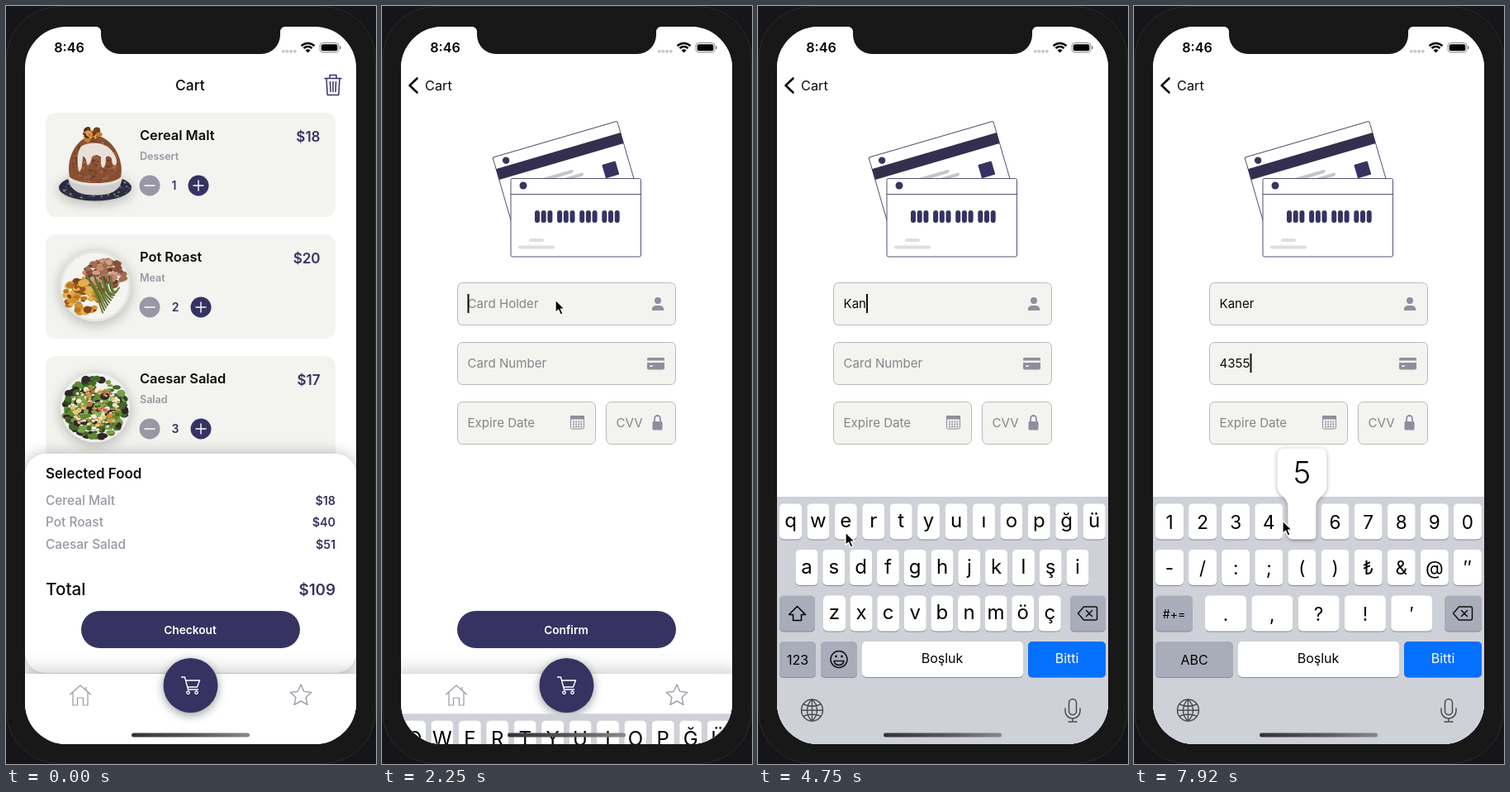
Write an HTML page with a canvas that moves like this. It is 448x916 px and loops after 8000 ms.

```html
<!DOCTYPE html>
<html lang="en">
<head>
<meta charset="utf-8">
<title>Cart checkout</title>
<style>
html, body { margin: 0; width: 100%; height: 100%; overflow: hidden; background: #15151a }
canvas { display: block; width: 448px; height: 916px }
</style>
</head>
<body>
<canvas id="stage"></canvas>
<script>
const LOOP = 8000, NAVY = '#363362', GRAY = '#9897a5', CREAM = '#f3f3ef', BODY = '#181818', INK = '#0c0c10';
const canvas = document.getElementById('stage'), c = canvas.getContext('2d');
const dpr = window.devicePixelRatio || 1;
canvas.width = 448 * dpr;
canvas.height = 916 * dpr;

const PUSH = 1271, KEYS_UP = 2218, NUMERIC = 5900;
const NAME = 'Kaner';
const presses = [[3350, 'K'], [3850, 'a'], [4300, 'n'], [4780, 'e'], [5230, 'r'],
  [6850, '4'], [7200, '3'], [7550, '5'], [7850, '5']];
const pointer = [[0, 452, 838], [90, 434, 828], [900, 282, 750], [1000, 269, 743], [1780, 269, 743],
  [2120, 210, 355], [2270, 210, 355], [2590, 176, 537], [3270, 288, 688], [3420, 288, 688],
  [3760, 60, 688], [3920, 60, 688], [4220, 256, 742], [4380, 256, 742], [4740, 106, 636],
  [4880, 106, 636], [5150, 139, 632], [5320, 139, 632], [5760, 200, 432], [5950, 200, 432],
  [6650, 161, 627], [6930, 161, 627], [7130, 122, 628], [7270, 122, 628], [7480, 203, 628],
  [7860, 203, 628], [7920, 180, 622], [8000, 172, 620]];

const lerp = (a, b, k) => a + (b - a) * k;
const clamp = v => Math.max(0, Math.min(1, v));
const spring = ms => { const u = Math.max(0, ms) * .01826; return 1 - (1 + u) * Math.exp(-u); };

function text(s, x, y, size, weight = 400, color = INK, align = 'left') {
  c.font = `${weight} ${size}px Inter, sans-serif`;
  c.textAlign = align;
  c.fillStyle = color;
  c.fillText(s, x, y);
}
function box(x, y, w, h, r, fill, line) {
  c.beginPath();
  c.roundRect(x, y, w, h, r);
  if (fill) { c.fillStyle = fill; c.fill(); }
  if (line) { c.strokeStyle = line; c.lineWidth = 1; c.stroke(); }
}
function oval(x, y, rx, ry, fill) {
  c.beginPath();
  c.ellipse(x, y, rx, ry, 0, 0, 7);
  c.fillStyle = fill;
  c.fill();
}
const disc = (x, y, r, fill) => oval(x, y, r, r, fill);
function shadow(color, blur, dy, draw) {
  c.save();
  c.shadowColor = color;
  c.shadowBlur = blur * dpr;
  c.shadowOffsetY = dy * dpr;
  draw();
  c.restore();
}
function at(x, y, draw, angle = 0) {
  c.save();
  c.translate(x, y);
  c.rotate(angle);
  draw();
  c.restore();
}
function icon(d, x, y, line, width = 1.5, fill) {
  at(x, y, () => {
    const p = new Path2D(d);
    c.lineJoin = c.lineCap = 'round';
    if (fill) { c.fillStyle = fill; c.fill(p); }
    if (line) { c.strokeStyle = line; c.lineWidth = width; c.stroke(p); }
  });
}
function scatter(seed, n, x, y, rx, ry, size, colors) {
  const rnd = () => (seed = seed * 16807 % 2147483647) / 2147483647;
  rnd();
  for (let i = 0; i < n; i++) {
    const a = rnd() * 6.283, r = Math.sqrt(rnd()), s = size * (.5 + rnd());
    oval(x + Math.cos(a) * r * rx, y + Math.sin(a) * r * ry, s, s * (.5 + rnd() * .5), colors[Math.floor(rnd() * colors.length)]);
  }
}

// Food, drawn around its centre
function dessert() {
  shadow('#0004', 16, 3, () => oval(0, 28, 44, 16, '#2b2c40'));
  scatter(9, 120, 0, 28, 42, 14, 1.4, ['#586184', '#20212f', '#6d7c6a', '#47406b']);
  icon('M-33 14C-32 32-19 37 0 37S32 32 33 14Z', 0, 0, 0, 0, '#cfccca');
  oval(0, 16, 33, 10, '#e6e2de');
  icon('M-31 15C-36-8-22-34-2-35S36-8 31 15C24 25-22 25-31 15Z', 0, 0, 0, 0, '#885033');
  scatter(4, 170, 0, -3, 28, 25, 1.7, ['#6d3d28', '#a3683f', '#7c472c', '#955a3c']);
  icon('M-17-22C-4-29 14-27 22-14Q28-5 25 1Q20 2 20-7Q17-12 13-9Q13 4 9 4Q6 1 7-9Q1-14-4-9Q-6 2-10 0Q-11-9-15-10Q-16 10-20 8Q-24-12-17-22Z', 0, 0, 0, 0, '#e9e1d9');
  scatter(7, 30, -5, -36, 10, 8, 3, ['#c27c2c', '#46271c', '#e2a04a', '#72421f']);
}
function plate() {
  shadow('#0004', 16, 3, () => disc(0, 0, 43, '#e6e6e2'));
  disc(0, 0, 40, '#f5f4f0');
  scatter(21, 110, -14, 11, 22, 22, 3.8, ['#d3922f', '#b87522', '#e4b04e', '#96571c', '#7c4518']);
  scatter(5, 110, 12, -15, 24, 17, 3.6, ['#a46b52', '#86503c', '#bf8a70', '#d2a184', '#6c3d2c']);
  for (let i = 0; i < 11; i++)
    icon(`M${-10 + i * 3} ${-12 + i % 3 * 4}Q${i * 2} ${5 + i} ${9 + i * 2} ${32 - i * 3}`, 0, 0, i % 2 ? '#4e6429' : '#6b7d3b', 2);
}
function salad() {
  shadow('#0004', 16, 3, () => disc(0, 0, 42, '#f1f1ee'));
  scatter(33, 280, 0, 0, 37, 36, 4, ['#41692a', '#2b471d', '#5e8a35', '#35242c', '#7da04a']);
  scatter(12, 170, 0, 0, 29, 27, 2.2, ['#eee2c6', '#d88d3e', '#f4ecd8', '#83a84c', '#c9683a', '#e5c377']);
}

const foods = [['Cereal Malt', 'Dessert', 18, 1, dessert], ['Pot Roast', 'Meat', 20, 2, plate], ['Caesar Salad', 'Salad', 17, 3, salad]];

function button(label, alpha = 1) {
  c.save();
  c.globalAlpha *= alpha;
  box(91, 731, 265, 45, 22.5, NAVY);
  text(label, 223, 758.5, 13.7, 600, '#fff', 'center');
  c.restore();
}

function cartPage(t) {
  foods.forEach(([name, kind, price, qty, art], i) => {
    const y = 129 + i * 147, px = qty > 1 ? 236 : 233;
    box(48, y, 351, 126, 12, CREAM);
    at(108, y + 62.5, art);
    text(name, 162, y + 32.5, 16.4, 600);
    text(kind, 162, y + 57, 12.5, 600, GRAY);
    disc(174, y + 88, 12.5, GRAY);
    icon('M-6 0H6', 174, y + 88, '#fff', 1.3);
    text(qty, (174 + px) / 2, y + 93, 14, 600, NAVY, 'center');
    disc(px, y + 88, 12.5, NAVY);
    icon('M-6 0H6M0-6V6', px, y + 88, '#fff', 1.4);
    text('$' + price, 380.5, y + 35, 17, 600, NAVY, 'right');
  });
  c.fillStyle = '#fff';
  c.fillRect(23, 690, 401, 210);
  shadow('#0004', 18, 0, () => box(23, 541, 401, 265, 25, '#fff'));
  text('Selected Food', 48, 570.5, 16.9, 600);
  foods.forEach(([name, , price, qty], i) => {
    text(name, 48, 602.5 + i * 26.7, 15.4, 500, GRAY);
    text('$' + price * qty, 399, 602.5 + i * 26.7, 14.3, 600, NAVY, 'right');
  });
  text('Total', 48, 712, 20.7, 500);
  text('$109', 399, 712, 18.8, 600, NAVY, 'right');
  button('Checkout', 1 - .6 * clamp((t - 1130) / 70) * clamp((1390 - t) / 120));
}

function creditCards() {
  const edge = '#53516f';
  at(134, 183, () => {
    box(0, 0, 157, 95, 2, '#fff', edge);
    disc(14.5, 8, 4.2, NAVY);
    c.fillStyle = '#332f4e';
    c.fillRect(0, 14.5, 157, 13.5);
    box(50, 41, 39, 4, 2, '#c6c6ca');
    box(64, 48, 36, 4, 2, '#c6c6ca');
    box(124.5, 45.5, 17, 17, 1, NAVY);
  }, -.283);
  box(156, 208.5, 157.5, 94.5, 2, '#fff', edge);
  icon('M156 227.5H313.5', 0, 0, edge, 1);
  disc(171, 217, 4.5, NAVY);
  for (let i = 0; i < 12; i++) box(185 + Math.floor(i / 3) * 27.1 + i % 3 * 7.7, 247, 6, 15, 3, NAVY);
  box(178, 281, 18, 4, 2, '#dededf');
  box(165, 289.5, 44, 4, 2, '#dededf');
}

function field(x, y, w, hint, value, caret) {
  box(x + .5, y + .5, w - 1, 51, 6, CREAM, '#b9b9bf');
  text(value || hint, x + 12.5, y + 31, 15.1, 400, value ? INK : '#85858b');
  if (caret) {
    c.fillStyle = INK;
    c.fillRect(x + 12.5 + (value ? c.measureText(value).width : 0), y + 14, 2, 23);
  }
}

function payPage(t) {
  c.fillStyle = '#fff';
  c.fillRect(23, 25, 401, 867);
  creditCards();
  const typed = presses.filter(p => p[0] <= t).length;
  const last = Math.max(KEYS_UP, ...presses.map(p => p[0]).filter(v => v <= t), t >= 5850 ? 5850 : 0);
  const blink = t >= KEYS_UP && (t - last) % 1000 < 550;
  const digits = presses.slice(5, Math.max(5, typed)).map(p => p[1]).join('');
  field(91, 334, 265, 'Card Holder', NAME.slice(0, typed), blink && t < 5850);
  field(91, 406, 265, 'Card Number', digits, blink && t >= 5850);
  field(91, 478, 168, 'Expire Date');
  field(271, 478, 85, 'CVV');
  const tone = '#8f8e9e';
  disc(334, 356, 4, tone);
  icon('M-7 8V6C-7 2-3 2 0 2S7 2 7 6V8Z', 334, 360, 0, 0, tone);
  box(321, 425, 21, 14.5, 2, tone);
  c.fillStyle = CREAM;
  c.fillRect(321, 428.5, 21, 2.5);
  c.fillRect(324, 434.5, 4, 1.5);
  box(228.5, 495.5, 16, 15.5, 2, null, tone);
  c.fillStyle = tone;
  c.fillRect(228, 495, 17, 4.5);
  for (let i = 0; i < 12; i++) c.fillRect(231 + i % 4 * 3.2, 501.5 + Math.floor(i / 4) * 3, 1.9, 1.8);
  icon('M-3.5-1V-4.5A3.5 3.5 0 0 1 3.5-4.5V-1', 333.5, 503, tone, 1.8);
  box(327.5, 502, 12, 10.5, 1.5, tone);
  button('Confirm');
}

function header(p) {
  const x = lerp(205, 52, p ** 1.16);
  c.save();
  c.globalAlpha = 1 - p;
  text('Cart', x, 102, 17.4, 500);
  icon('M-10-8H10M-4-8V-12H4V-8M-8-8L-6.8 12H6.8L8-8M-3.5-4L-3 8M0-4V8M3.5-4L3 8', 396, 95.5, NAVY, 1.5);
  c.globalAlpha = p;
  text('Cart', x, 102, 16.3);
  icon('M5-8.5L-4 0L5 8.5', 37.5, 96, INK, 2.6);
  c.restore();
}

function tabBar() {
  shadow('#0004', 24, 0, () => { c.fillStyle = '#fff'; c.fillRect(13, 807, 421, 110); });
  icon('M-12.5-1L0-12L12.5-1M-9-3V12H-3.5V3H3.5V12H9V-3M7-10V-6', 90, 833, GRAY, 1.2);
  let star = '';
  for (let i = 0; i < 10; i++) {
    const r = i % 2 ? 6.4 : 13.5, a = i * Math.PI / 5;
    star += `${i ? 'L' : 'M'}${Math.sin(a) * r} ${-Math.cos(a) * r}`;
  }
  icon(star + 'Z', 357, 833.5, GRAY, 1.3);
  shadow('#0006', 12, 3, () => disc(223.5, 821, 33, NAVY));
  icon('M-11-10H-7L-3 5H9M-6-6H11L8 2H-4', 223.5, 821, '#fff', 1.4);
  icon('M-3 8a1.7 1.7 0 1 0 .1 0ZM7 8a1.7 1.7 0 1 0 .1 0Z', 223.5, 820, '#fff', 1.3);
}

// Keyboard
function keyCap(x, y, w, fill = '#fff') {
  box(x, y + 1, w, 43, 5, '#888a90');
  box(x, y, w, 43, 5, fill);
}
function popup(label, x, y, w) {
  const m = w > 30 ? 13 : 14, l = x - m, r = x + w + m, b = y + 43;
  shadow('#0005', 5, 1, () => icon(
    `M${l + 9} ${y - 67}H${r - 9}Q${r} ${y - 67} ${r} ${y - 58}V${y - 22}C${r} ${y - 8} ${x + w} ${y - 10} ${x + w} ${y + 4}` +
    `V${b - 5}Q${x + w} ${b} ${x + w - 5} ${b}H${x + 5}Q${x} ${b} ${x} ${b - 5}V${y + 4}` +
    `C${x} ${y - 10} ${l} ${y - 8} ${l} ${y - 22}V${y - 58}Q${l} ${y - 67} ${l + 9} ${y - 67}Z`, 0, 0, 0, 0, '#fff'));
  text(label, x + w / 2, y - 25, 37, 300, '#000', 'center');
}
function keyboard(t) {
  const top = lerp(892, 593, spring(t - KEYS_UP)), dark = '#a9acb9';
  const caps = t < 3480, numeric = t >= NUMERIC;
  const hit = presses.find(p => t >= p[0] && t < p[0] + 130);
  let bubble;
  c.fillStyle = '#cfd1d9';
  c.fillRect(23, top, 401, 320);
  const row = (labels, first, step, w, y) => [...labels].forEach((s, i) => {
    const x = first + i * step - w / 2;
    keyCap(x, y, w);
    text(s, x + w / 2, y + (caps || numeric ? 30 : 28.5), numeric ? 22.5 : 24, 400, '#000', 'center');
    if (hit && hit[1] === s) bubble = [s, x, y, w];
  });
  const y1 = top + 8.5, y2 = top + 64, y3 = top + 119.5, y4 = top + 175;
  if (numeric) {
    row('1234567890', 43, 40.1, 34, y1);
    row('-/:;()₺&@″', 43, 40.1, 34, y2);
    row('.,?!′', 111, 56.3, 50, y3);
    keyCap(26, y3, 45, dark);
    text('#+=', 48.5, y3 + 27, 14, 400, '#000', 'center');
    keyCap(26, y4, 94, dark);
    text('ABC', 73, y4 + 28, 16, 400, '#000', 'center');
  } else {
    const set = s => caps ? s.toLocaleUpperCase('tr') : s;
    row(set('qwertyuıopğü'), 39.5, 33.42, 27, y1);
    row(set('asdfghjklşi'), 59, 32.8, 27, y2);
    row(set('zxcvbnmöç'), 92.5, 32.6, 27, y3);
    keyCap(26, y3, 43, caps ? '#fff' : dark);
    icon('M0-9L10 1H5V8H-5V1H-10Z', 47.5, y3 + 22, '#000', 1.5, caps && '#000');
    keyCap(26, y4, 44, dark);
    text('123', 48, y4 + 27.5, 16, 400, '#000', 'center');
    keyCap(76, y4, 44, dark);
    icon('M10 0A10 10 0 1 1-10 0A10 10 0 1 1 10 0M-6 2H6Q5 7 0 7T-6 2', 98, y4 + 21.5, '#111', 1.5);
    disc(94.5, y4 + 18, 1.4, '#111');
    disc(101.5, y4 + 18, 1.4, '#111');
  }
  const bx = numeric ? 376 : 378;
  keyCap(bx, y3, 421 - bx, dark);
  icon('M-12 0L-5-8H9Q11-8 11-6V6Q11 8 9 8H-5ZM-2-3.5L5 3.5M5-3.5L-2 3.5', (bx + 421) / 2, y3 + 21.5, '#111', 1.5);
  keyCap(126, y4, 195);
  text('Boşluk', 223, y4 + 26, 16, 400, '#000', 'center');
  keyCap(327, y4, 94, '#0670ff');
  text('Bitti', 374, y4 + 26, 16, 400, '#fff', 'center');
  icon('M13 0A13 13 0 1 1-13 0A13 13 0 1 1 13 0M-13 0H13M0-13V13M0-13C-8-6-8 6 0 13C8 6 8-6 0-13M-10-7Q0-3 10-7M-10 7Q0 3 10 7', 65.5, top + 258, '#4b4c52', 1.4);
  icon('M-4.5-9A4.5 4.5 0 0 1 4.5-9V1A4.5 4.5 0 0 1-4.5 1ZM-9-2V1A9 9 0 0 0 9 1V-2M0 10V14M-5 14H5', 381, top + 258, '#4b4c52', 1.5);
  if (bubble) popup(...bubble);
}

function statusBar() {
  icon('M109 20V25A6 6 0 0 1 115 31V35A23 23 0 0 0 138 58H309A23 23 0 0 0 332 35V31A6 6 0 0 1 338 25V20Z', 0, 0, 0, 0, BODY);
  text('8:46', 76.5, 56, 16.2, 600, '#000', 'center');
  for (let i = 0; i < 4; i++) box(334 + i * 4.6, 53, 3.6, 3.6, 1.2, '#c8c8cc');
  c.strokeStyle = '#000';
  c.lineWidth = 2.5;
  c.lineCap = 'butt';
  for (const r of [11, 7]) {
    c.beginPath();
    c.arc(365.5, 56, r, -2.36, -.78);
    c.stroke();
  }
  icon('M0 0L-3-3Q0-5.5 3-3Z', 365.5, 56.5, 0, 0, '#000');
  box(380, 44.5, 23, 11.5, 3.5, null, '#8a8a8a');
  box(381.7, 46.2, 19.6, 8.1, 2, '#000');
  box(404, 48.3, 1.6, 4, 1, '#8a8a8a');
}

function cursor(t) {
  const i = Math.max(1, pointer.findIndex(p => p[0] >= t));
  const [t0, x0, y0] = pointer[i - 1], [t1, x1, y1] = pointer[i];
  const k = clamp((t - t0) / (t1 - t0)), e = k * k * (3 - 2 * k);
  icon('M0 0V15.5L3.6 12.2L6.2 18L9 16.8L6.5 11.2H11.3Z', lerp(x0, x1, e), lerp(y0, y1, e), '#fff', 1.3, '#000');
}

function dim(y, h, alpha) {
  c.fillStyle = `rgba(0,0,0,${alpha})`;
  c.fillRect(23, y, 401, h);
}

function draw(t) {
  c.setTransform(dpr, 0, 0, dpr, 0, 0);
  c.fillStyle = '#15151a';
  c.fillRect(0, 0, 448, 916);
  box(.5, .5, 447, 915, 64, BODY, '#2b2b2d');
  c.save();
  c.beginPath();
  c.roundRect(23, 25, 401, 867, 50);
  c.clip();
  c.fillStyle = '#fff';
  c.fillRect(23, 25, 401, 867);
  const p = spring(t - PUSH);
  if (p < .999) {
    at(-120 * p, 0, () => cartPage(t));
    dim(25, 104, .1 * p);
    dim(129, 763, .125 * p);
  }
  if (p > 0) at(401 * (1 - p), 0, () => payPage(t));
  header(p);
  tabBar();
  if (t > KEYS_UP) keyboard(t);
  const g = c.createLinearGradient(152, 0, 295, 0);
  g.addColorStop(0, '#333');
  g.addColorStop(.5, '#555');
  g.addColorStop(1, '#888');
  box(152, 878.5, 143, 5, 2.5, g);
  c.restore();
  statusBar();
  cursor(t);
}

function frame() {
  draw(performance.now() % LOOP);
  requestAnimationFrame(frame);
}
frame();
</script>
</body>
</html>
```
